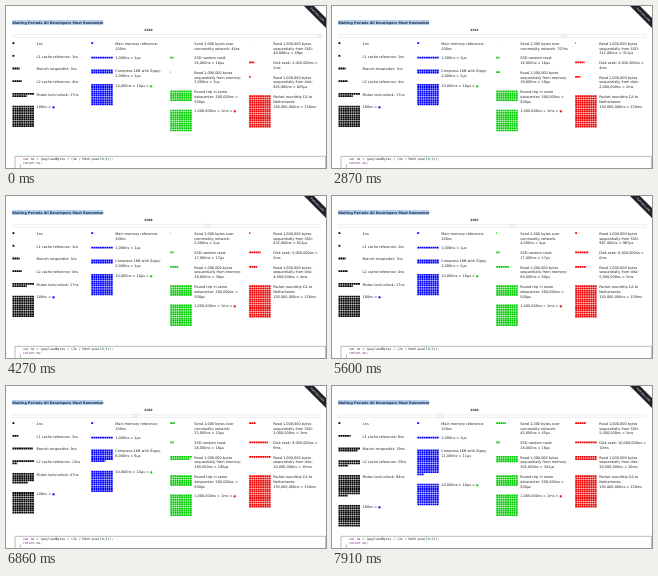
An HTML page that plays this animation: 320x162 px, repeating every 8000 ms.

```html
<!DOCTYPE html>
<html lang="en">
<head>
<meta charset="utf-8">
<title>Waiting Periods</title>
<style>
html, body { margin: 0; width: 100%; height: 100%; overflow: hidden; background: #fff; }
svg { display: block; width: 100vw; height: 100vh; }
text { font: 3.48px "DejaVu Sans", sans-serif; fill: #222; white-space: pre; }
.title { font-size: 3.4px; font-weight: bold; fill: #1c2c48; }
.year { font-size: 3px; font-weight: bold; text-anchor: middle; }
.swatch { font-size: 2.6px; }
.code { font: 3.2px "DejaVu Sans Mono", monospace; }
.key { fill: #708; }
.num { fill: #164; }
.ribbon { font: bold 2.3px "DejaVu Sans", sans-serif; fill: #ccc; text-anchor: middle; }
</style>
</head>
<body>
<svg viewBox="0 0 320 162" xmlns="http://www.w3.org/2000/svg">
  <rect width="320" height="162" fill="#fff"/>
  <rect x="6" y="14" width="91" height="5" fill="#b5d0ec"/>
  <text class="title" x="6.2" y="17.8">Waiting Periods All Developers Must Remember</text>
  <text class="year" id="year" x="142.5" y="24.5"></text>
  <rect x="6.2" y="28.8" width="308" height="2.6" rx=".6" fill="#fff" stroke="#c4c4c4" stroke-width=".3"/>
  <rect id="handle" y="28.2" width="4.2" height="3.8" rx=".6" fill="#f4f4f4" stroke="#c8c8c8" stroke-width=".3"/>
  <g id="items"></g>
  <path d="M9 162V150.3H319.6V162" fill="none" stroke="#777" stroke-width=".5"/>
  <text class="code" x="17" y="153.8"><tspan class="key">var</tspan> ns = (payloadBytes / (2e / Math.pow(<tspan class="num">10</tspan>,<tspan class="num">9</tspan>));</text>
  <text class="code" x="17" y="157.6"><tspan class="key">return</tspan> ns;</text>
  <text class="code" x="13.2" y="161.4">}</text>
  <path d="M298 0H308L320 12V22Z" fill="#22222a"/>
  <text class="ribbon" transform="translate(311.5 8.5) rotate(45)" y=".8">Fork this code</text>
</svg>
<script>
const LOOP = 8000;
const FIRST_YEAR = 2020;
// Moments at which the slider drops back by one year
const STEPS = [0, 70, 490, 1050, 1470, 1960, 2310, 2660, 2870, 3010, 3500, 3920,
  5320, 5600, 5740, 5880, 6020, 6300, 6790, 7280, 7770];
const PITCH = 2.18, SIZE = 1.8, PER_ROW = 10, LINE = 4.8, TOP = 37.5;
const COLUMNS = [
  { x: 6.5, color: '#000', unit: 1, next: '#00f' },
  { x: 85.3, color: '#00f', unit: 100, next: '#0c0' },
  { x: 164.3, color: '#0c0', unit: 1e4, next: '#e00' },
  { x: 243.2, color: '#e00', unit: 1e6 }
];
const $ = id => document.getElementById(id);

const round = v => Math.floor(v + 0.4999);
const halving = (value, base, years, year) => value * 2 ** ((base - year) / years);

function format(ns, gap = ' ') {
  if (ns < 1000) return round(ns) + 'ns';
  const [unit, name] = ns < 1e6 ? [1e3, 'μs'] : [1e6, 'ms'];
  const n = round(ns / unit);
  return `${(n * unit).toLocaleString('en-US')}ns ≈${gap}${n}${name}`;
}

// Each item: nanoseconds, label, and whether it ends in a colour swatch
function latencies(year) {
  const slow = halving(1, 2005, 2, Math.min(year, 2005));
  const cycles = n => n / 3 * slow;
  const l1 = cycles(3), branch = cycles(10), l2 = cycles(13), mutex = cycles(50);
  const zip = 2000 * slow;
  const net = halving(16000, 2003, 2, year);
  const ssd = 16000 * Math.exp(0.008 * Math.max(0, 2014 - year));
  const memory = halving(301000, 2000, 3, year);
  const ssdRead = halving(4976000, 2000, 3, year);
  const seek = halving(1e7, 2000, 10, year);
  const disk = halving(1e7, 2002, year > 2002 ? 5 : 2, year);
  const read = 'Read 1,000,000 bytes\nsequentially from ';
  return [
    [
      [1, '1ns'],
      [l1, 'L1 cache reference: ' + format(l1)],
      [branch, 'Branch mispredict: ' + format(branch)],
      [l2, 'L2 cache reference: ' + format(l2)],
      [mutex, 'Mutex lock/unlock: ' + format(mutex)],
      [100, '100ns = ', true]
    ], [
      [100, 'Main memory reference:\n100ns'],
      [1000, format(1000)],
      [zip, 'Compress 1KB with Zippy:\n' + format(zip)],
      [1e4, format(1e4) + ' = ', true]
    ], [
      [net, 'Send 2,000 bytes over\ncommodity network:' + (net < 1000 ? ' ' : '\n') + format(net)],
      [ssd, 'SSD random read:\n' + format(ssd)],
      [memory, read + 'memory:\n' + format(memory)],
      [5e5, 'Round trip in same\ndatacenter: 500,000ns ≈\n500μs'],
      [1e6, format(1e6) + ' = ', true]
    ], [
      [ssdRead, read + 'SSD:\n' + format(ssdRead)],
      [seek, 'Disk seek: ' + format(seek, '\n')],
      [disk, read + 'disk:\n' + format(disk)],
      [1.5e8, 'Packet roundtrip CA to\nNetherlands:\n' + format(1.5e8)]
    ]
  ];
}

// The last square is cut to the remaining fraction
function squares(x, y, count, color) {
  let d = '';
  for (let i = 0; i < count - 1e-6; i++) {
    const w = (SIZE * Math.min(1, count - i)).toFixed(2);
    const left = x + i % PER_ROW * PITCH;
    const top = y + Math.floor(i / PER_ROW) * PITCH;
    d += `M${left.toFixed(2)} ${top.toFixed(2)}h${w}v${SIZE}h-${w}z`;
  }
  return `<path d="${d}" fill="${color}"/>`;
}

function column({ x, color, unit, next }, items) {
  let y = TOP, out = '';
  for (const [ns, label, swatch] of items) {
    const count = ns / unit;
    const lines = label.split('\n');
    out += squares(x, y - 1.3, count, color);
    lines.forEach((line, i) => {
      const mark = swatch && i === lines.length - 1
        ? `<tspan class="swatch" fill="${next}">■</tspan>` : '';
      out += `<text x="${x + 24}" y="${y + 1.3 + i * LINE}">${line}${mark}</text>`;
    });
    const rows = Math.ceil(count / PER_ROW - 1e-6);
    y += Math.max(12.7, 4.9 + lines.length * LINE, 8.2 + rows * PITCH);
  }
  return out;
}

let shown;
function show(year) {
  if (year === shown) return;
  shown = year;
  const data = latencies(year);
  $('year').textContent = year;
  $('handle').setAttribute('x', 3.9 + 308 * (year - 1990) / 30);
  $('items').innerHTML = COLUMNS.map((c, i) => column(c, data[i])).join('');
}

function tick() {
  const t = performance.now() % LOOP;
  show(FIRST_YEAR + 1 - STEPS.filter(s => s <= t).length);
  requestAnimationFrame(tick);
}
tick();
</script>
</body>
</html>
```
